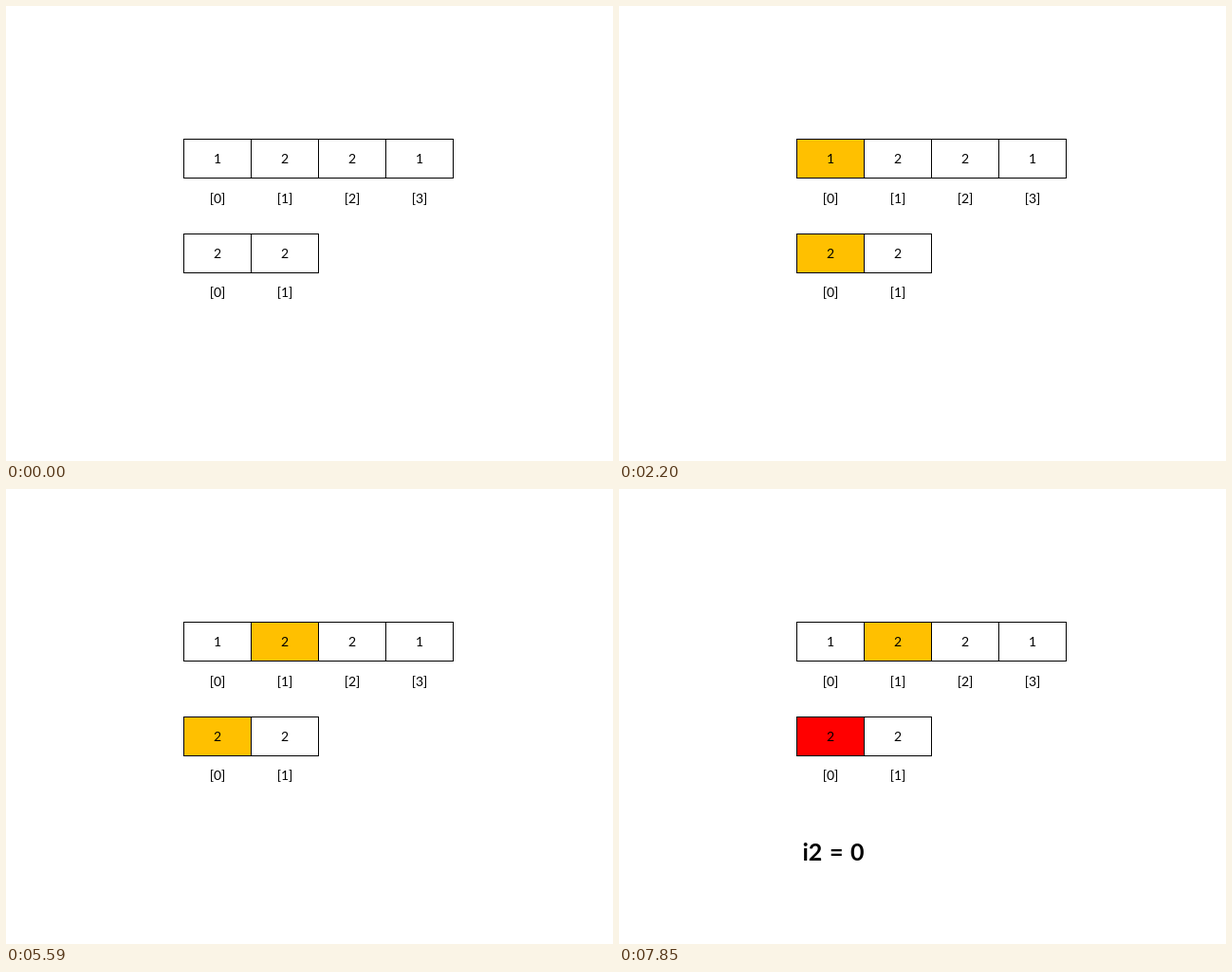
An HTML page for the animation above (8 s loop, 640 by 480 pixels).

```html
<!DOCTYPE html>
<html lang="en">
<head>
<meta charset="utf-8">
<title>Array comparison</title>
<style>
  html, body { margin: 0; width: 100%; height: 100%; overflow: hidden; background: #fff; }
  svg { display: block; width: 640px; height: 480px; }
  rect { fill: #fff; stroke: #000; stroke-width: 1; }
  text { font: 14px Lato, "Open Sans", sans-serif; text-anchor: middle; fill: #000; }
  .result { font-size: 25px; font-weight: 700; text-anchor: start; word-spacing: 1.5px; }
</style>
</head>
<body>
<svg viewBox="0 0 640 480"></svg>
<script>
const LOOP = 8000;
const CELL_W = 71, CELL_H = 41, LEFT = 187.5;
const WHITE = '#fff', AMBER = '#ffc000', RED = '#ff0000';
const svg = document.querySelector('svg');

function add(tag, attrs, content = '') {
  const el = document.createElementNS('http://www.w3.org/2000/svg', tag);
  for (const [key, value] of Object.entries(attrs)) el.setAttribute(key, value);
  el.textContent = content;
  svg.append(el);
  return el;
}

function addArray(values, top, indexBaseline) {
  return values.map((value, i) => {
    const x = LEFT + i * CELL_W, mid = x + CELL_W / 2;
    const cell = add('rect', { x, y: top, width: CELL_W, height: CELL_H });
    add('text', { x: mid, y: top + 25.5 }, value);
    add('text', { x: mid, y: indexBaseline }, `[${i}]`);
    return cell;
  });
}

const upper = addArray([1, 2, 2, 1], 140.5, 208);
const lower = addArray([2, 2], 240.5, 307);
const result = add('text', { x: 193.5, y: 392, class: 'result' }, 'i2 = 0');

// start time, active upper cell, active lower cell, lower colour, result shown
const steps = [
  [0, -1, -1, AMBER, false],
  [1070, 0, -1, AMBER, false],
  [2200, 0, 0, AMBER, false],
  [3330, 0, 1, AMBER, false],
  [4460, 1, -1, AMBER, false],
  [5590, 1, 0, AMBER, false],
  [6720, 1, 0, RED, false],
  [7850, 1, 0, RED, true],
];

function paint(cells, active, color) {
  cells.forEach((cell, i) => { cell.style.fill = i === active ? color : WHITE; });
}

function draw(now) {
  const t = now % LOOP;
  const [, up, low, color, done] = steps.findLast(([start]) => start <= t);
  paint(upper, up, AMBER);
  paint(lower, low, color);
  result.style.visibility = done ? 'visible' : 'hidden';
}

const begin = performance.now();
function tick() {
  draw(performance.now() - begin);
  requestAnimationFrame(tick);
}
tick();
</script>
</body>
</html>
```
